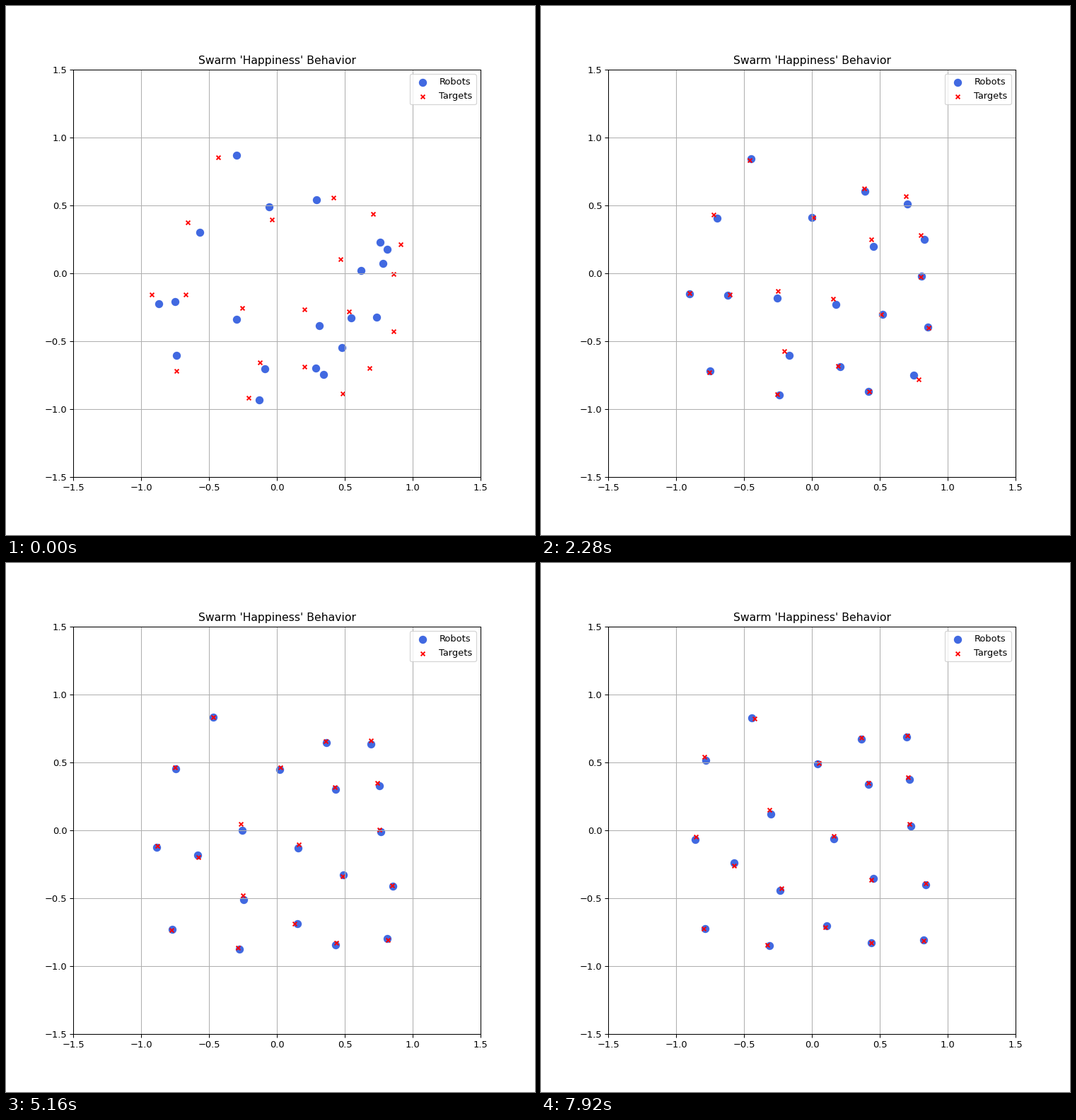
Recreate the animation shown at these times as a matplotlib script. Size 748 px wide and 748 px high, loop 8000 ms.

```python
import numpy as np
import matplotlib.pyplot as plt
from matplotlib.animation import FuncAnimation

FRAMES, INTERVAL, HOLD = 200, 40, 3
GAIN = 0.045                # share of the gap to its target covered per step
PEAK, CENTER, SHARPNESS = 14, (0.48, 0.46), 15

# where the robots set out; everything after follows from the coverage rule
START = np.array([
    (-.300, .870), (.292, .542), (-.058, .490), (-.568, .302), (.757, .229),
    (.809, .174), (.781, .073), (.619, .018), (-.870, -.224), (-.753, -.211),
    (-.297, -.341), (.309, -.385), (.546, -.328), (.731, -.323), (.479, -.547),
    (-.743, -.604), (-.092, -.703), (.283, -.698), (.343, -.745), (-.131, -.932),
])

axis = np.linspace(-1, 1, 50)
GRID = np.stack(np.meshgrid(axis, axis), axis=-1).reshape(-1, 2)
DENSITY = 1 + PEAK * np.exp(-SHARPNESS * ((GRID - CENTER) ** 2).sum(axis=1))


def find_targets(robots):
    """Density-weighted centre of each robot's Voronoi cell."""
    dist = ((GRID[:, None] - robots) ** 2).sum(axis=2)
    cells = dist.argmin(axis=1) == np.arange(len(robots))[:, None]
    weights = cells * DENSITY
    return weights @ GRID / weights.sum(axis=1, keepdims=True)


def simulate(steps):
    robots, states = START, []
    for _ in range(steps):
        targets = find_targets(robots)
        states.append((robots, targets))
        robots = robots + GAIN * (targets - robots)
    return states


states = simulate(FRAMES)[::HOLD]

fig, ax = plt.subplots(figsize=(8, 8), dpi=93.5)
ax.set_xlim(-1.5, 1.5)
ax.set_ylim(-1.5, 1.5)
ax.set_aspect('equal')
ax.grid(True)
ax.set_title("Swarm 'Happiness' Behavior")
robot_dots = ax.scatter(*START.T, s=60, c='royalblue', label='Robots')
target_marks = ax.scatter(*START.T, s=20, c='red', marker='x', label='Targets')
ax.legend(loc='upper right')


def update(frame):
    robots, targets = states[frame // HOLD]
    robot_dots.set_offsets(robots)
    target_marks.set_offsets(targets)
    return robot_dots, target_marks


anim = FuncAnimation(fig, update, frames=FRAMES, interval=INTERVAL,
                     repeat=True, repeat_delay=0)
plt.show()
```
